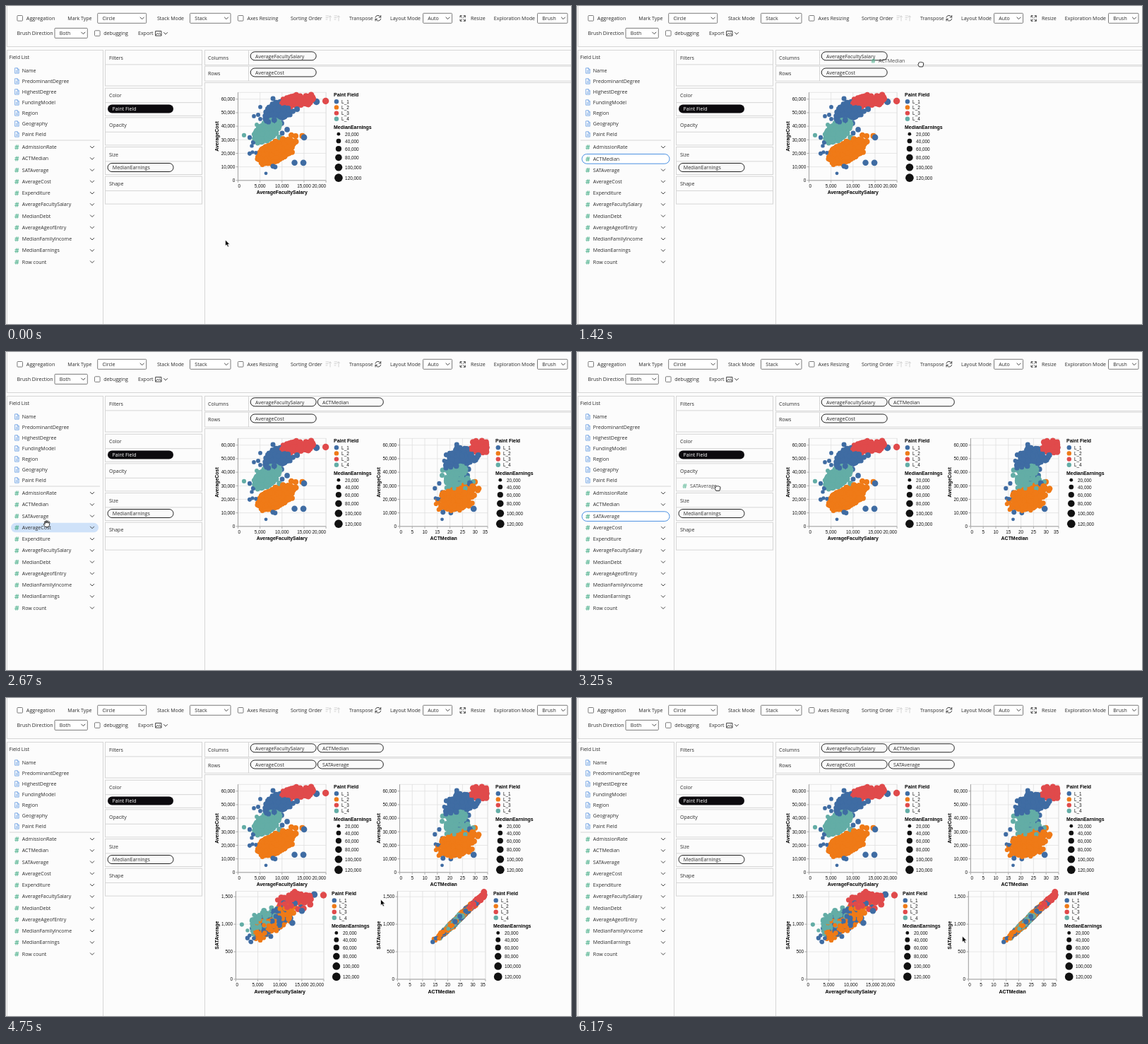
These frames come from a looping animation (800x450 px, 6260 ms). An HTML page:

```html
<!DOCTYPE html>
<html lang="en">
<head>
<meta charset="utf-8">
<title>Chart builder</title>
<style>
  html, body { margin: 0; width: 100%; height: 100%; overflow: hidden; background: #fcfcfc; }
  svg { display: block; width: 800px; height: 450px; }
  text { font: 7.05px "Open Sans", "Noto Sans", sans-serif; fill: #2b2b2b; }
  .plot text { font: 6.4px "Liberation Sans", Arial, sans-serif; fill: #111; }
  .plot .bold { font-weight: bold; font-size: 6.95px; fill: #000; }
  .line { fill: none; stroke: #333; stroke-width: .9; stroke-linecap: round; stroke-linejoin: round; }
  .panel { fill: none; stroke: #d6d6d6; stroke-width: 1; }
  .pill { fill: #fafafa; stroke: #222; stroke-width: 1; }
  .select { fill: #fff; stroke: #6f6f6f; stroke-width: .9; }
</style>
</head>
<body>
<svg id="stage" viewBox="0 0 800 450"></svg>
<script>
const LOOP = 6260;
const COLORS = ['#3f6ca3', '#ef7a17', '#e04a4b', '#63ada6'];
const ROW_TOP = 199.7, ROW_STEP = 16.25;
const dimensions = ['Name', 'PredominantDegree', 'HighestDegree', 'FundingModel', 'Region', 'Geography', 'Paint Field'];
const measures = ['AdmissionRate', 'ACTMedian', 'SATAverage', 'AverageCost', 'Expenditure', 'AverageFacultySalary',
  'MedianDebt', 'AverageAgeofEntry', 'MedianFamilyIncome', 'MedianEarnings', 'Row count'];
const rowY = i => ROW_TOP + i * ROW_STEP;

// Markup helpers: y of a label is its vertical centre.
const label = (x, y, s, extra = '') => `<text x="${x}" y="${y + 2.5}" ${extra}>${s}</text>`;
const rect = (x, y, w, h, cls, r = 0) => `<rect x="${x}" y="${y}" width="${w}" height="${h}" rx="${r}" class="${cls}"/>`;
const path = (d, extra = '') => `<path class="line" d="${d}" ${extra}/>`;
const segment = (x1, y1, x2, y2, color = '#d6d6d6', w = 1) =>
  `<path d="M${x1} ${y1}L${x2} ${y2}" stroke="${color}" stroke-width="${w}"/>`;
const dot = (x, y, r, fill) => `<circle cx="${x.toFixed(2)}" cy="${y.toFixed(2)}" r="${r.toFixed(2)}" fill="${fill}"/>`;
const chevron = (x, y) => path(`M${x - 2.6} ${y - 1.3}l2.6 2.6 2.6-2.6`);
const checkbox = (x, y) => rect(x, y, 7.6, 7.6, 'select', 1);
const pill = (x, y, s) => rect(x, y, 93, 12, 'pill', 6) + label(x + 6.8, y + 6.2, s);
const hash = (x, y) => path(`M${x - 2.4} ${y - 1.1}h5M${x - 2.8} ${y + 1.3}h5M${x - .5} ${y - 2.9}l-1 6M${x + 1.7} ${y - 2.9}l-1 6`,
  'style="stroke:#3aa981;stroke-width:.8"');
const select = (x, y, w, s) => rect(x, y, w, 14, 'select', 1) + label(x + 6.8, y + 7.2, s) + chevron(x + w - 6, y + 7);

function toolbar() {
  const sortIcon = x => path(`M${x} 14h4M${x} 16.5h3M${x} 19h2M${x + 6} 21v-7m-1.6 1.6l1.6-1.6 1.6 1.6`, 'style="stroke:#cfcfcf"');
  return segment(1, 57.5, 800, 57.5) + segment(1.5, 0, 1.5, 57.5)
    + checkbox(15.9, 13.5) + label(28.8, 17.5, 'Aggregation', 'style="font-size:7.25px"')
    + label(87.3, 17.5, 'Mark Type') + select(129.7, 10.3, 69, 'Circle')
    + label(214, 17.5, 'Stack Mode') + select(260.5, 10.3, 57.5, 'Stack')
    + checkbox(328.4, 13.5) + label(341.5, 17.5, 'Axes Resizing')
    + label(403, 17.5, 'Sorting Order') + sortIcon(453) + sortIcon(465)
    + label(486, 17.5, 'Transpose')
    + path('M523 16.2a3.8 3.8 0 0 1 6.8-1.2l.9 1m0-2.6v2.6h-2.6M530.7 18.2a3.8 3.8 0 0 1-6.8 1.2l-.9-1m0 2.6v-2.6h2.6')
    + label(544, 17.5, 'Layout Mode') + select(590.5, 10.3, 41, 'Auto')
    + path('M643 16v-2.3h2.3M648 13.7h2.3V16M650.3 19v2.3H648M645.3 21.3H643V19M643.3 14l2.3 2.3M650 14l-2.3 2.3M650 21l-2.3-2.3M643.3 21l2.3-2.3')
    + label(658, 17.5, 'Resize') + label(690.8, 17.5, 'Exploration Mode') + select(752.5, 10.3, 42.5, 'Brush')
    + label(15.5, 38.8, 'Brush Direction') + select(69, 31.4, 46.3, 'Both')
    + checkbox(125.5, 34.8) + label(138.3, 38.8, 'debugging') + label(187, 38.8, 'Export')
    + path('M212 35.5h8v6.6h-8zM212.3 41l2.4-2.6 1.6 1.6 1.4-1.2 2 2.2M217.8 37.2h.1') + chevron(226, 38.8);
}

function fieldList() {
  const doc = y => path(`M13 ${y - 3.7}h3.2l2 2v5.4h-5.2zM16 ${y - 3.7}v2.2h2.2M14.3 ${y + .2}h2.6M14.3 ${y + 1.9}h2.6`,
    'style="stroke:#5e97e0;stroke-width:.75"');
  return rect(1.5, 62.5, 136, 400, 'panel') + label(4.5, 72.8, 'Field List') + segment(5, 190, 133, 190)
    + dimensions.map((s, i) => doc(91.5 + 15 * i) + label(22.8, 91.5 + 15 * i, s)).join('')
    + '<rect id="rowMark" x="7" width="124" height="13.6" rx="6.8"/>'
    + measures.map((s, i) => `<g id="row${i}">${hash(15.3, rowY(i))}${label(22.8, rowY(i), s)}</g>`
      + `<g id="arrow${i}">${chevron(122, rowY(i))}</g>`).join('');
}

function shelves() {
  const shelf = (s, top, h) => rect(140.5, top, 137, h, 'panel') + segment(140.5, top + 20.4, 277.5, top + 20.4)
    + label(146, top + 10.6, s);
  const bar = (s, y) => rect(281.5, y, 530, 21, 'panel') + segment(343.5, y, 343.5, y + 21) + label(286, y + 10.6, s);
  return shelf('Filters', 62.5, 50.5)
    + ['Color', 'Opacity', 'Size', 'Shape'].map((s, i) => shelf(s, 116.3 + 41.6 * i, 39)).join('')
    + '<rect x="144" y="139.5" width="93" height="12" rx="6" fill="#0c0a0e"/>'
    + label(150.5, 145.8, 'Paint Field', 'style="fill:#fff"')
    + pill(144, 222.5, 'MedianEarnings')
    + bar('Columns', 62.5) + bar('Rows', 85.2) + rect(281.5, 108.5, 530, 400, 'panel')
    + pill(346.2, 64.8, 'AverageFacultySalary') + pill(346.2, 88, 'AverageCost')
    + `<g id="pillX">${pill(441.3, 64.8, 'ACTMedian')}</g><g id="pillY">${pill(441.3, 88, 'SATAverage')}</g>`;
}

let seed = 20231;
function random() {
  seed = (seed * 1664525 + 1013904223) % 4294967296;
  return seed / 4294967296;
}
const noise = () => (random() + random() + random() + random() - 2) * 1.73;

// Schools are placed as skewed ellipses on the first plot; test scores follow from salary and cost.
function makeSchools() {
  const groups = [
    { n: 250, cx: 384, cy: 151, rx: 18, ry: 16, skew: -.3, act: 24.5, at: 8.9, slope: 1.15,
      keep: (x, y) => y < 167 - .4 * (x - 370) && !(x > 389 && y < 142),
      extra: [360,143, 351,156, 357,154, 360,160, 372,143, 378,131, 345,186, 349,207, 345,209, 350,193, 348,198, 354,208,
        378,227, 381,228, 408.5,222, 421,222, 368,237, 439.5,135.5, 422,186, 412,146, 406,149, 402,154, 390,166, 398,175, 391,180] },
    { n: 430, cx: 381, cy: 206, rx: 26, ry: 15, skew: -.36, act: 22.7, at: 8.4, slope: 1.15,
      extra: [404,183, 419.5,184, 410,184, 405,207, 397,210, 410,192, 363,225, 376,224] },
    { n: 72, cx: 411, cy: 134, rx: 24, ry: 7.5, skew: -.12, act: 31.5, at: 13, slope: .6,
      extra: [452.5,134.5, 432,126, 411,126, 428,139, 403,142] },
    { n: 330, cx: 369, cy: 177, rx: 19, ry: 14.5, skew: -.5, act: 22.8, at: 6.5, slope: .8,
      extra: [337,183, 345,187, 352,192, 355,168, 387,186] }
  ];
  const schools = [];
  groups.forEach((g, group) => {
    const add = (x, y) => {
      const salary = (x - 328.5) / 6.225, cost = (247 - y) / 1.92;
      const lift = group === 0 ? .12 * (cost - 50) : 0;
      const act = Math.max(14, Math.min(34.4, g.act + g.slope * (salary - g.at) + lift + noise() * 1.8));
      schools.push({ group, salary, cost, act, sat: .67 + .0424 * (act - 14) + noise() * .02,
        r: y > 235 ? 2.4 : 2.6 + .11 * salary + noise() * .22, order: random() });
    };
    for (let i = 0; i < g.n; i++) {
      const angle = random() * 2 * Math.PI, reach = Math.pow(random(), .55);
      const dx = g.rx * reach * Math.cos(angle);
      const x = g.cx + dx, y = g.cy + g.skew * dx + g.ry * reach * Math.sin(angle);
      if (!g.keep || g.keep(x, y)) add(x, y);
    }
    for (let i = 0; i < g.extra.length; i += 2) add(g.extra[i], g.extra[i + 1]);
  });
  return schools.sort((a, b) => a.order - b.order);
}

const axes = {
  salary: { title: 'AverageFacultySalary', max: 20, step: 5, text: v => v ? v + ',000' : '0' },
  act: { title: 'ACTMedian', max: 35, step: 5, text: v => v },
  cost: { title: 'AverageCost', max: 65, step: 10, text: v => v ? v + ',000' : '0' },
  sat: { title: 'SATAverage', max: 1.6, step: .5, text: v => v >= 1 ? (v * 1000).toLocaleString('en-US') : v * 1000 }
};

function chart(schools, left, bottom, xKey, yKey, titleX) {
  const size = 124.6, top = bottom - size, right = left + size;
  const xAxis = axes[xKey], yAxis = axes[yKey];
  const px = v => left + v / xAxis.max * size, py = v => bottom - v / yAxis.max * size;
  let out = '';
  for (let v = 0; v <= xAxis.max; v += xAxis.step) {
    const anchor = v === 0 ? 'start' : v === xAxis.max ? 'end' : 'middle';
    out += segment(px(v), top, px(v), bottom, '#ddd', .7) + segment(px(v), bottom, px(v), bottom + 3, '#888', .7)
      + label(px(v), bottom + 7.4, xAxis.text(v), `text-anchor="${anchor}"`);
  }
  for (let v = 0; v <= yAxis.max; v += yAxis.step) {
    out += segment(left, py(v), right, py(v), '#ddd', .7) + segment(left - 3, py(v), left, py(v), '#888', .7)
      + label(left - 4.3, py(v) - .2, yAxis.text(v), 'text-anchor="end"');
  }
  out += `<rect x="${left}" y="${top}" width="${size}" height="${size}" fill="none" stroke="#ddd" stroke-width=".7"/>`
    + segment(left, top, left, bottom, '#888', .7) + segment(left, bottom, right, bottom, '#888', .7)
    + label(left + size / 2, bottom + 17, xAxis.title, 'class="bold" text-anchor="middle"')
    + `<text class="bold" text-anchor="middle" transform="translate(${titleX + 2.2} ${bottom - size / 2}) rotate(-90)">${yAxis.title}</text>`
    + schools.map(s => dot(px(s[xKey]), py(s[yKey]), s.r, COLORS[s.group])).join('');

  const lx = right + 11;
  out += label(lx, top + 2.8, 'Paint Field', 'class="bold"') + label(lx, top + 49.2, 'MedianEarnings', 'class="bold"');
  COLORS.forEach((c, i) => {
    const y = top + 13 + 8.2 * i;
    out += dot(lx + 3.8, y, 3.2, c) + label(lx + 11, y, 'L_' + (i + 1));
  });
  [59, 68.8, 79.8, 92.2, 106, 121].forEach((y, i) => {
    out += dot(lx + 6.8, top + y, 2.38 * Math.sqrt(i + 1), '#111') + label(lx + 16, top + y, (i + 1) * 20 + ',000');
  });
  return `<g class="plot">${out}</g>`;
}

function cursors() {
  const shape = (id, d, fill, stroke, w) =>
    `<path id="${id}" d="${d}" fill="${fill}" stroke="${stroke}" stroke-width="${w}" stroke-linejoin="round"/>`;
  return shape('pointer', 'M0 0V8.6L2 6.8 3.4 10 5 9.3 3.6 6.2H6.3Z', '#000', '#fff', .7)
    + shape('hand', 'M-2.4 4.6L-4.6 1.2Q-5 0-3.7 .1L-2.8 1-3.6-2.6Q-3.4-3.8-2.4-3L-1.7-.8-1.7-4Q-1-5.2-.2-4L0-1 .6-3.8Q1.5-4.8 2-3.6L1.9-.6 2.8-2.4Q3.8-3 4-1.8L3.2 2.6 2.4 4.6Z', '#fff', '#111', .85)
    + shape('fist', 'M-2.4 4L-4 1.4Q-4.4 .1-3.2 0L-3.2-1.6Q-2.6-2.9-1.5-2.2-.6-3.2 .3-2.3 1.4-3 2.1-1.9 3.7-2.2 3.7-.6L3.2 2.4 2.5 4Z', '#fff', '#111', .9);
}

const schools = makeSchools();
const ghost = (id, s) => `<g id="${id}" opacity=".85">${hash(-7.5, 0)}${label(0, 0, s)}</g>`;
document.getElementById('stage').innerHTML = '<rect width="800" height="450" fill="#fcfcfc"/>'
  + toolbar() + fieldList() + shelves()
  + chart(schools, 328.5, 246.8, 'salary', 'cost', 299)
  + `<g id="chartTwo">${chart(schools, 557.4, 246.8, 'act', 'cost', 528)}</g>`
  + `<g id="chartsBelow">${chart(schools, 325.4, 398, 'salary', 'sat', 299)}${chart(schools, 554.3, 398, 'act', 'sat', 528)}</g>`
  + ghost('ghost1', measures[1]) + ghost('ghost2', measures[2]) + cursors();

const $ = id => document.getElementById(id);
const show = (id, on) => $(id).setAttribute('visibility', on ? 'visible' : 'hidden');
const move = (id, x, y) => $(id).setAttribute('transform', `translate(${x} ${y})`);

// Cursor track: time, x, y.
const track = [
  [60, 310.5, 331], [580, 73, 223], [790, 78, 222], [1420, 487, 82], [1750, 485, 78], [2200, 482, 76],
  [2670, 58, 243], [2820, 62, 235], [2960, 62, 235], [3750, 509, 96], [4100, 503, 95], [4380, 503, 95],
  [4750, 530.5, 285], [5400, 545.5, 337]
];
const drags = [{ row: 1, from: 830, to: 2080 }, { row: 2, from: 2960, to: 4380 }];

function cursorAt(t) {
  const next = track.findIndex(k => k[0] > t);
  if (next === 0) return track[0].slice(1);
  if (next < 0) return track[track.length - 1].slice(1);
  const a = track[next - 1], b = track[next];
  const u = (t - a[0]) / (b[0] - a[0]), e = u * u * (3 - 2 * u);
  return [a[1] + (b[1] - a[1]) * e, a[2] + (b[2] - a[2]) * e];
}

function rowUnder([x, y]) {
  const i = Math.round((y - ROW_TOP) / ROW_STEP);
  return x > 7 && x < 131 && i >= 0 && i < measures.length ? i : -1;
}

function draw(t) {
  const [x, y] = cursorAt(t);
  const drag = drags.find(d => t >= d.from && t < d.to);
  const hovered = rowUnder(cursorAt(t - (t < 700 ? 90 : 0)));
  const marked = drag ? drag.row : hovered;

  show('rowMark', marked >= 0);
  if (marked >= 0) {
    const mark = $('rowMark');
    mark.setAttribute('y', rowY(marked) - 6.8 + (drag ? .4 : 0));
    mark.setAttribute('fill', drag ? '#fff' : '#cfe2f9');
    mark.setAttribute('stroke', drag ? '#4a90e2' : 'none');
  }
  drags.forEach(d => {
    const active = d === drag;
    const [gx, gy] = cursorAt(d.from);
    show('arrow' + d.row, !active);
    move('row' + d.row, 0, active ? .5 : 0);
    show('ghost' + d.row, active);
    move('ghost' + d.row, x - gx + 22.8, y - gy + rowY(d.row));
  });

  show('pillX', t >= 2080);
  show('chartTwo', t >= 2240);
  show('pillY', t >= 4380);
  show('chartsBelow', t >= 4740);

  const shape = drag ? 'fist' : rowUnder([x, y]) >= 0 ? 'hand' : 'pointer';
  ['pointer', 'hand', 'fist'].forEach(id => { show(id, id === shape); move(id, x, y); });
}

const start = performance.now();
function tick() {
  draw((performance.now() - start) % LOOP);
  requestAnimationFrame(tick);
}
tick();
</script>
</body>
</html>
```
